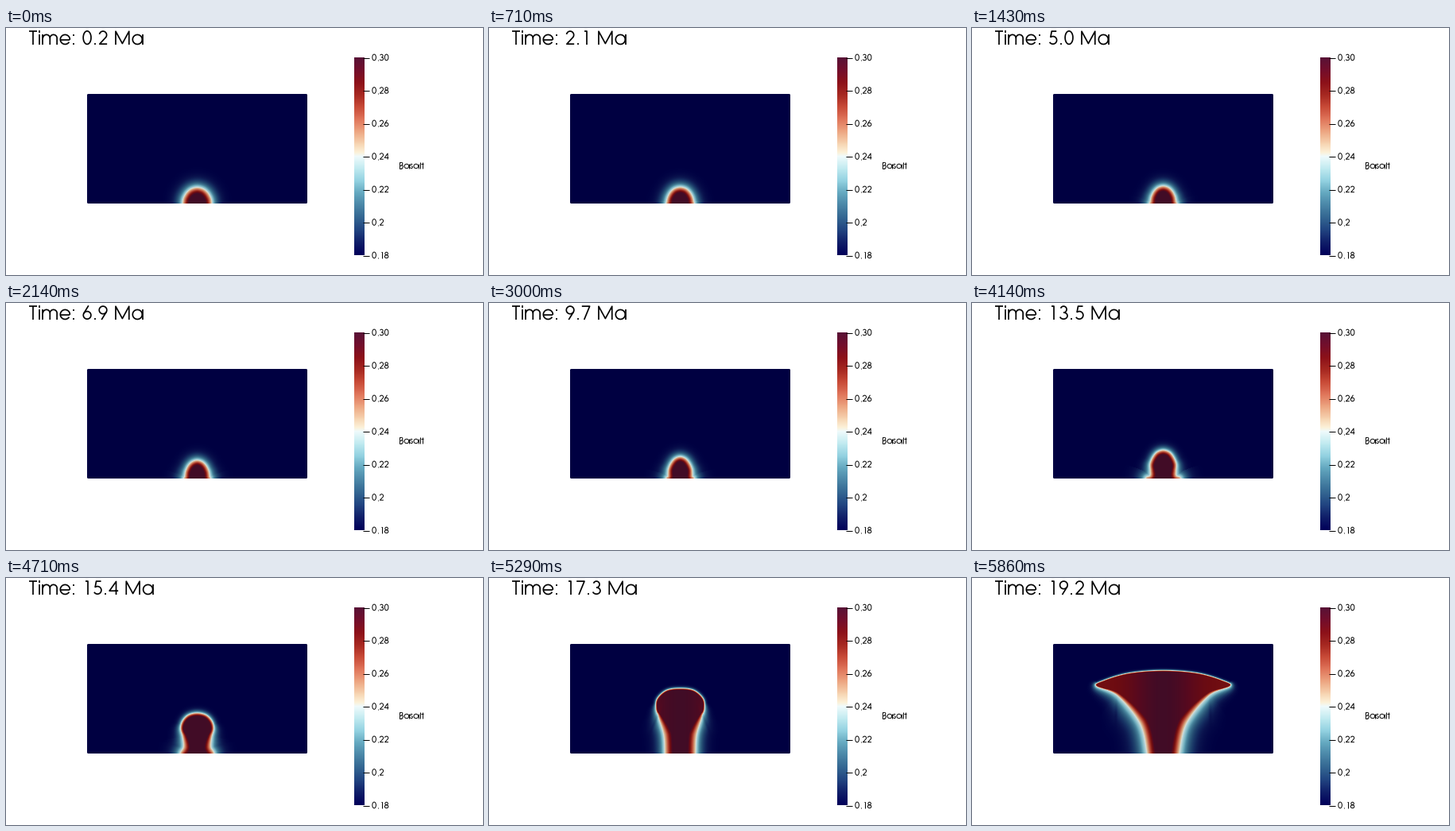
Animation, 600 px wide and 311 px high, one loop 6010 ms. Source, as a matplotlib script:

```python
import numpy as np
import matplotlib.pyplot as plt
from matplotlib.animation import FuncAnimation
from matplotlib.collections import LineCollection
from matplotlib.colors import LinearSegmentedColormap
from matplotlib.patches import FancyBboxPatch

W, H, DPI = 600, 311, 100
FRAMES, LOOP_MS = 42, 6010
PX = 72 / DPI  # points per pixel

CMAP = LinearSegmentedColormap.from_list("coolwarm_ext", [
    (0, "#000059"), (.0625, "#101e69"), (.125, "#204380"), (.1875, "#336591"),
    (.25, "#4985a6"), (.3125, "#63a7bf"), (.375, "#92d1e0"), (.4375, "#c0eaf0"),
    (.5, "#f0fbfc"), (.52, "#fcf1d9"), (.5625, "#f7d5b2"), (.625, "#eda682"),
    (.6875, "#e0755a"), (.75, "#c84a37"), (.8125, "#a62821"), (.875, "#8c1119"),
    (.9375, "#730e2c"), (1, "#591236")], N=512)


# --- geometric stroke lettering, in em units: (advance, strokes) ---

def arc(cx, cy, rx, ry, start=0, end=360):
    a = np.radians(np.linspace(start, end, 40))
    return list(zip(cx + rx * np.cos(a), cy + ry * np.sin(a)))


def dot(x, y):
    return [(x, y), (x, y + .095)]


DIGITS = {
    "0": [arc(.277, .37, .205, .345)],
    "1": [[(.2, .705), (.325, .705), (.325, 0)]],
    "2": [arc(.277, .51, .19, .195, 170, -38) + [(.1, .035), (.49, .035)]],
    "3": [arc(.27, .54, .16, .165, 160, -90), arc(.27, .205, .2, .17, 90, -160)],
    "4": [[(.41, 0), (.41, .69), (.06, .2), (.52, .2)]],
    "5": [[(.45, .705), (.2, .705), (.14, .38)], arc(.265, .235, .2, .2, 130, -150)],
    "6": [arc(.277, .235, .2, .2), [(.1, .33), (.35, .74)]],
    "7": [[(.06, .705), (.47, .705), (.18, 0)]],
    "8": [arc(.277, .545, .155, .16), arc(.277, .21, .2, .175)],
    "9": [arc(.277, .505, .2, .2), [(.454, .41), (.2, 0)]],
}
GLYPHS = {c: (.554, strokes) for c, strokes in DIGITS.items()}
GLYPHS.update({
    " ": (.277, []),
    ".": (.277, [dot(.139, 0)]),
    ":": (.277, [dot(.139, 0), dot(.139, .45)]),
    "T": (.426, [[(.01, .705), (.416, .705)], [(.213, .705), (.213, 0)]]),
    "i": (.2, [[(.1, 0), (.1, .547)], dot(.1, .645)]),
    "l": (.2, [[(.1, 0), (.1, .74)]]),
    "t": (.339, [[(.17, 0), (.17, .74)], [(.02, .515), (.32, .515)]]),
    "m": (.938, [[(.1, 0), (.1, .547)],
                 arc(.285, .34, .185, .185, 180, 0) + [(.469, 0)],
                 arc(.654, .34, .185, .185, 180, 0) + [(.838, 0)]]),
    "e": (.65, [[(.08, .255), (.57, .255)], arc(.325, .273, .25, .25, -4, 328)]),
    "a": (.683, [arc(.33, .273, .25, .25), [(.59, 0), (.59, .547)]]),
    "M": (.919, [[(.11, 0), (.11, .7), (.46, .06), (.81, .7), (.81, 0)]]),
    "B": (.574, [[(.3, .39), (.1, .39), (.1, .705), (.3, .705)],
                 arc(.3, .548, .14, .157, 90, -90),
                 [(.1, .39), (.1, .035), (.32, .035)],
                 arc(.32, .213, .17, .178, 90, -90)]),
    "s": (.388, [arc(.19, .4, .11, .115, 20, 250), arc(.19, .16, .13, .125, 75, -170)]),
})


def text_strokes(text, x, y, size, vertical=False):
    segments, pen = [], 0
    for char in text:
        advance, strokes = GLYPHS[char]
        for stroke in strokes:
            p = np.array(stroke) * size
            along, up = p[:, 0] + pen, p[:, 1]
            xy = (x - up, y - along) if vertical else (x + along, y - up)
            segments.append(np.column_stack(xy))
        pen += advance * size
    return segments


# --- plume: half outline from crown to foot, measured from the base centre ---

KEYS = [0, 5, 15, 21, 29, 33, 37, 39, 41]
OUTLINES = np.array([
    [(0, 20.5), (7.5, 18.7), (13, 14.4), (16.5, 9), (18, 5), (18.4, 2), (18.5, 0)],
    [(0, 21), (7, 19.3), (12, 15), (15.2, 9.5), (16.6, 5), (17.2, 2), (17.8, 0)],
    [(0, 23.5), (6.5, 21.5), (11.5, 16.5), (14.6, 10), (15.6, 5), (16, 2), (17, 0)],
    [(0, 28.5), (7, 26), (12, 20), (15, 13), (15.6, 7), (15.8, 3), (18, 0)],
    [(0, 37), (8, 34.5), (13.5, 28), (17, 19), (16.5, 10), (17, 4), (23, 0)],
    [(0, 56), (12, 53.5), (20, 46), (22.5, 36), (19, 24), (17.5, 10), (21, 0)],
    [(0, 91), (19, 88.5), (32, 77), (33.5, 64), (30, 52), (22, 28), (19, 0)],
    [(0, 102), (35, 99.5), (60, 88), (66, 80), (48, 68), (25, 32), (20, 0)],
    [(0, 107.5), (50, 103.5), (88, 97), (103, 90), (68, 78), (34, 44), (21, 0)],
])
# edge softness: outer crown, outer side, inner crown, inner side
SOFTNESS = np.array([
    (18, 18, 18, 18), (17, 18, 16, 17), (15, 20, 15, 16), (14, 20, 14, 16),
    (11, 21, 13, 17), (7, 20, 8, 20), (3, 20, 4, 24), (3, 28, 4, 24), (3, 34, 4, 26),
])
LEFT, TOP, COLS, ROWS = 102, 83, 277, 138
GX, GY = np.meshgrid(np.arange(COLS // 2 + 1), ROWS - .5 - np.arange(ROWS))


def at_frame(table, i):
    k = min(np.searchsorted(KEYS, i, side="right") - 1, len(KEYS) - 2)
    f = (i - KEYS[k]) / (KEYS[k + 1] - KEYS[k])
    return table[k] * (1 - f) + table[k + 1] * f


def catmull_rom(points, steps=24):
    """Smooth curve with its outward normals and curve parameter."""
    u = np.linspace(0, len(points) - 3, (len(points) - 3) * steps + 1)
    k = np.minimum(u.astype(int), len(points) - 4)
    t = (u - k)[:, None]
    a, b, c, d = (points[k + j] for j in range(4))
    m0, m1, rise = (c - a) / 2, (d - b) / 2, c - b
    quad, cube = 3 * rise - 2 * m0 - m1, m0 + m1 - 2 * rise
    curve = b + m0 * t + quad * t**2 + cube * t**3
    tangent = m0 + 2 * quad * t + 3 * cube * t**2
    normal = np.column_stack([-tangent[:, 1], tangent[:, 0]])
    normal /= np.hypot(*normal.T)[:, None] + 1e-9
    return curve, normal, u


def plume_field(i):
    pts = at_frame(OUTLINES, i)
    foot = pts[-1, 0]
    pts = np.vstack([pts[1] * (-1, 1), pts, (foot, -15), (foot, -30)])
    curve, normal, u = catmull_rom(pts)

    x, y = GX.ravel(), GY.ravel()
    near = np.argmin((x[:, None] - curve[:, 0])**2 + (y[:, None] - curve[:, 1])**2, axis=1)
    q, n, u = curve[near], normal[near], u[near]
    dist = (x - q[:, 0]) * n[:, 0] + (y - q[:, 1]) * n[:, 1]

    out_top, out_side, in_top, in_side = at_frame(SOFTNESS, i)
    soft = np.where(dist > 0,
                    np.interp(u, [2.5, 4.5], [out_top, out_side]),
                    np.interp(u, [3.5, 5], [in_top, in_side]))
    v = 1.37 * np.exp(-1.009 * np.clip(1 + dist / soft, 0, None)**2)

    # the spreading head is slightly poorer than the central column
    late = np.clip((i - 31) / 6, 0, 1)
    v = np.minimum(v, 1 - .14 * late * (1 - np.exp(-(x / 40)**2)))

    # faint fold in the haze under the head
    fx, fy, lean = (np.interp(i, [37, 41], pair) for pair in ((34, 68), (35, 52), (-.4, .1)))
    fold = np.exp(-((x - fx - lean * (y - fy)) / 2)**2 - ((y - fy) / 14)**2)
    v *= 1 - .3 * np.clip((i - 34) / 3, 0, 1) * fold

    half = v.reshape(GX.shape)
    return np.hstack([half[:, :0:-1], half])


def shaded(values):
    rgb = CMAP(values)[..., :3]
    return np.clip(.66 * rgb + .22 * rgb**2, 0, 1)


# --- stage ---

fig = plt.figure(figsize=(W / DPI, H / DPI), dpi=DPI, facecolor="white")
ax = fig.add_axes([0, 0, 1, 1])
ax.axis("off")


def add_strokes(segments, width):
    lines = LineCollection(segments, colors="black", linewidths=width * PX, capstyle="butt")
    ax.add_collection(lines)
    return lines


domain = ax.imshow(shaded(np.zeros((ROWS, COLS))), interpolation="nearest",
                   extent=(LEFT, LEFT + COLS, TOP + ROWS, TOP))
domain.set_clip_path(FancyBboxPatch((LEFT, TOP), COLS, ROWS, transform=ax.transData,
                                    boxstyle="round,pad=0,rounding_size=1.5"))

ax.imshow(np.linspace(1, 0, 512)[:, None], cmap=CMAP, extent=(438, 451, 286.5, 37.5))
for k, label in enumerate(["0.30", "0.28", "0.26", "0.24", "0.22", "0.2", "0.18"]):
    tick = 37.5 + 41.5 * k
    add_strokes([[(449, tick), (457, tick)]], 1)
    add_strokes(text_strokes(label, 460, tick + 3.6, 11.2), .95)
add_strokes(text_strokes("Basalt", 494, 177, 11), .95)
clock = add_strokes([], 1.7)

ax.set(xlim=(0, W), ylim=(H, 0), aspect="auto")


def update(i):
    domain.set_data(shaded(plume_field(i)))
    age = .2 + 19.5 * i / (FRAMES - 1)
    clock.set_segments(text_strokes(f"Time: {age:.1f} Ma", 29, 21, 24))
    return domain, clock


anim = FuncAnimation(fig, update, frames=FRAMES, interval=LOOP_MS / FRAMES,
                     repeat=True, repeat_delay=0, blit=False)
plt.show()
```
